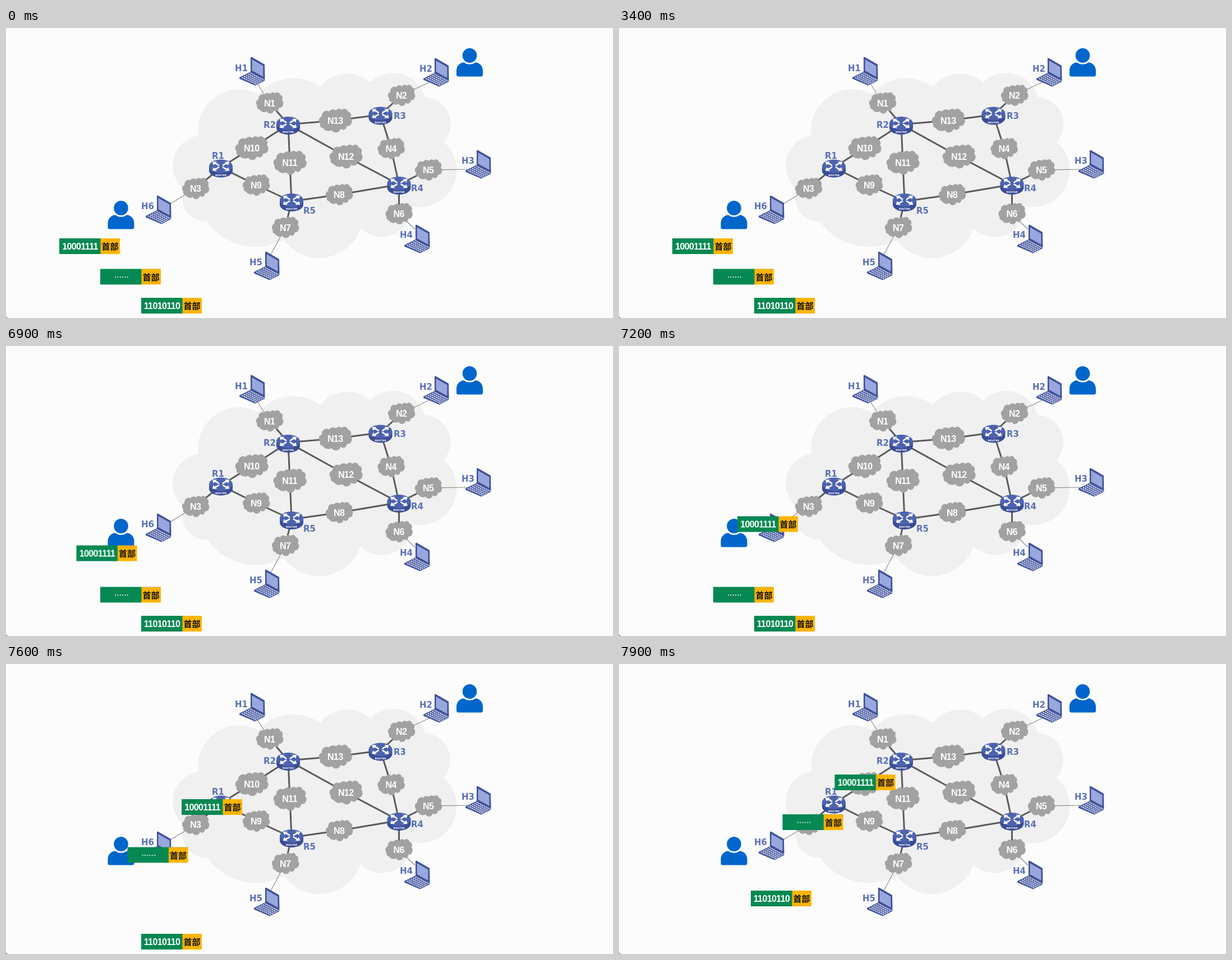
These frames come from a looping animation (1082 by 517 pixels, 8000 ms). An HTML page:

```html
<!DOCTYPE html>
<html lang="zh-CN">
<head>
<meta charset="utf-8">
<title>Packet switching</title>
<style>
  html, body { margin: 0; width: 100%; height: 100%; overflow: hidden; background: #fcfcfc; }
  svg { display: block; width: 1082px; height: 517px; }
  .net, .bits { font: bold 16px "Liberation Sans", Arial, sans-serif; letter-spacing: -.6px; fill: #fff; text-anchor: middle; }
  .name { font: bold 15px "DejaVu Sans", Verdana, sans-serif; fill: #5a70b6; }
  .tiny { font: bold 4.4px "DejaVu Sans", Verdana, sans-serif; fill: #fff; text-anchor: middle; }
  .head { font: bold 15px "Noto Sans CJK SC", "Noto Sans CJK", sans-serif; fill: #111; text-anchor: middle; }
  .dots { font: bold 13px "Noto Sans CJK SC", "Noto Sans CJK", sans-serif; fill: #fff; text-anchor: middle; }
</style>
</head>
<body>
<svg viewBox="0 0 1082 517">
  <defs>
    <path id="cloud" d="M343 192A73 73 0 0 1 450 118A82 82 0 0 1 560 105A61 61 0 0 1 649 97A58 58 0 0 1 746 123A48 48 0 0 1 780 203A66 66 0 0 1 724 318A54 54 0 0 1 632 357A78 78 0 0 1 495 378A107 107 0 0 1 358 345A41 41 0 0 1 318 288A54 54 0 0 1 343 192Z"/>
    <g id="person" fill="#0066cc">
      <ellipse rx="12.8" ry="13"/>
      <path d="M-23.5 34V27C-23.5 19-18 13-10.5 12.2C-4 17 4 17 10.5 12.2C18 13 23.5 19 23.5 27V34Q23.5 37.5 20 37.5H-20Q-23.5 37.5-23.5 34Z"/>
    </g>
    <g id="laptop">
      <path d="M0 36L20 26L45 40V42L28 50.5L0 38.5Z" fill="#46579f"/>
      <g id="keys" stroke="#eef1fb" stroke-width="1.7" stroke-dasharray="2.6 1.1"/>
      <path d="M20 0L22 -.3L45 13L45.5 40L20 27Z" fill="#3f4f95"/>
      <path d="M22.5 4L42.5 15.5V35L22.5 24Z" fill="#98a8de"/>
    </g>
    <path id="arrow" d="M2 1.6L4.2 .2Q7 2.8 10.8 4L13.2 1.8L15.2 8L6.8 8.2L9 6.2Q5 4.8 2 1.6Z" fill="#fff"/>
    <g id="router">
      <path d="M-21-4V4A21 12 0 0 0 21 4V-4Z" fill="#394c95"/>
      <ellipse cy="-4" rx="21" ry="12" fill="#4d63af"/>
      <g transform="translate(0 -4)">
        <use href="#arrow"/>
        <use href="#arrow" transform="scale(-1 1)"/>
        <use href="#arrow" transform="scale(1 -1)"/>
        <use href="#arrow" transform="scale(-1 -1)"/>
      </g>
      <text class="tiny" y="13.4">ROUTER</text>
    </g>
  </defs>
  <use href="#cloud" fill="#f0f0f0"/>
  <path d="M0 513Q.5 516.5 4 517H0Z" fill="#777"/>
  <g id="map"></g>
  <g id="packets"></g>
</svg>
<script>
const $ = id => document.getElementById(id);

function add(parent, tag, attrs, text) {
  const el = document.createElementNS('http://www.w3.org/2000/svg', tag);
  for (const k in attrs) el.setAttribute(k, attrs[k]);
  if (text) el.textContent = text;
  return parent.appendChild(el);
}

// x, y, label x, label y
const routers = {
  R1: [383, 250.5, 367, 233], R2: [503, 174, 459, 177.5], R3: [667.5, 156.5, 691, 162],
  R4: [700.5, 281, 722, 291], R5: [509, 311, 530, 331]
};
// x, y, attached nodes
const nets = {
  N1: [470, 133.5, 'R2 H1'], N2: [705, 120, 'R3 H2'], N3: [338, 286, 'R1 H6'],
  N4: [686.5, 215, 'R3 R4'], N5: [753, 253, 'R4 H3'], N6: [700.5, 331, 'R4 H4'],
  N7: [498, 355.5, 'R5 H5'], N8: [594, 297, 'R5 R4'], N9: [446, 280, 'R1 R5'],
  N10: [438, 214, 'R1 R2'], N11: [506, 240, 'R2 R5'], N12: [606, 229, 'R2 R4'],
  N13: [587, 165, 'R2 R3']
};
// laptop corner, label, cable end
const hosts = {
  H1: [416, 52, 408, 76.5, 446, 96], H2: [744, 54, 737, 77.5, 760, 94],
  H3: [819, 218, 812, 242, 823, 252], H4: [710, 351, 702, 374, 729, 359],
  H5: [442, 399, 434, 422.5, 471, 406], H6: [249, 299, 241, 323, 292, 314]
};

for (let i = 0; i < 5; i++) {
  const x = 19.5 - i * 3.8, y = 28 + i * 2;
  add($('keys'), 'path', { d: `M${x} ${y}l${24 + i * .6} ${13 - i * .2}` });
}

// Cables reach a router slightly above its middle
const map = $('map');
for (const [x, y, ends] of Object.values(nets)) {
  for (const id of ends.split(' ')) {
    const host = hosts[id];
    const [x2, y2] = host ? host.slice(4) : [routers[id][0], routers[id][1] - 2];
    add(map, 'line', {
      x1: x, y1: y, x2, y2,
      stroke: host ? '#8a8a8a' : '#5a5a5a', 'stroke-width': host ? 1.1 : 3
    });
  }
}
for (const [id, [x, y]] of Object.entries(nets)) {
  const [w, h] = id.length > 2 ? [59, 42] : [48.5, 37.5];
  add(map, 'use', {
    href: '#cloud', fill: '#a2a2a2',
    transform: `translate(${x} ${y}) scale(${w / 507} ${h / 327}) translate(-549.5 -244.5)`
  });
  add(map, 'text', { class: 'net', x: x - .3, y: y + 6 }, id);
}
for (const [kind, nodes] of [['router', routers], ['laptop', hosts]]) {
  for (const [id, [x, y, lx, ly]] of Object.entries(nodes)) {
    add(map, 'use', { href: '#' + kind, x, y });
    add(map, 'text', { class: 'name', x: lx, y: ly }, id);
  }
}
for (const [x, y] of [[826.5, 49], [205, 321]]) add(map, 'use', { href: '#person', x, y });

// Each path row: time in ms, left, top
const LOOP = 8000, STEP = 100;
const packets = [
  ['10001111', [6800, 95, 375], [6900, 125.5, 355.5], [7200, 211, 303.5], [7600, 313, 241], [7900, 384.5, 197]],
  ['……', [7300, 168, 429.5], [7600, 216.5, 326.5], [7900, 291.5, 268]],
  ['11010110', [7700, 241, 481], [7900, 235, 404]]
];

for (const [text, ...path] of packets) {
  const g = add($('packets'), 'g', {});
  add(g, 'rect', { width: 74, height: 28, fill: '#058852' });
  add(g, 'rect', { x: 73.5, width: 34.5, height: 28, fill: '#ffb400' });
  const dots = text[0] === '…';
  add(g, 'text', { class: dots ? 'dots' : 'bits', x: dots ? 38 : 37, y: dots ? 19 : 20 }, text);
  add(g, 'text', { class: 'head', x: 90.5, y: 20 }, '首部');

  const first = path[0], last = path[path.length - 1];
  const rows = [[0, first[1], first[2]], ...path, [LOOP, last[1], last[2]]];
  g.animate(rows.map(([t, x, y], i) => ({
    offset: t / LOOP,
    transform: `translate(${x}px, ${y}px)`,
    easing: rows[i + 1] ? `steps(${(rows[i + 1][0] - t) / STEP}, end)` : 'linear'
  })), { duration: LOOP, iterations: Infinity });
}
</script>
</body>
</html>
```
